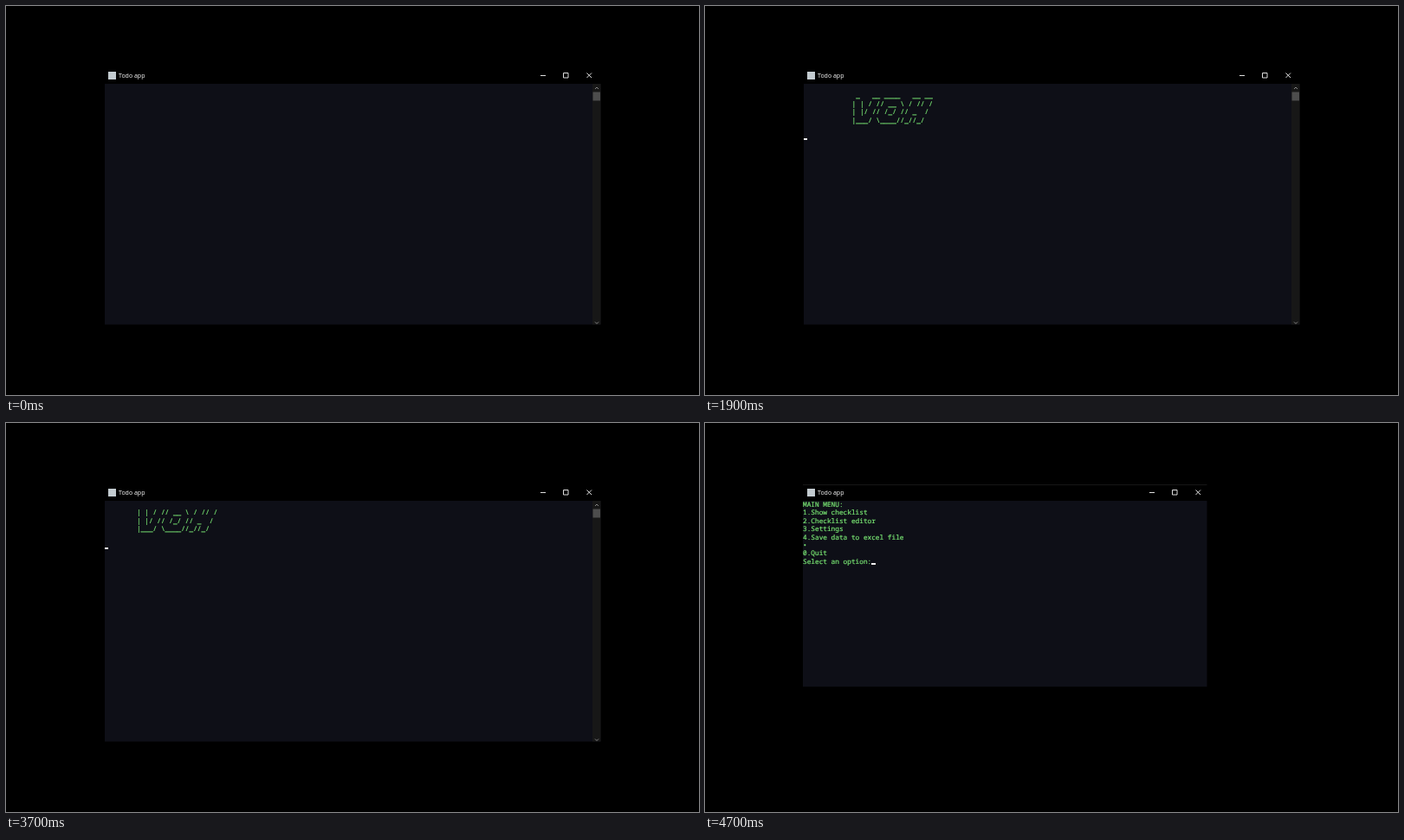
An HTML page for the animation above (5 s loop, 800 by 450 pixels).

```html
<!DOCTYPE html>
<html lang="en">
<head>
<meta charset="utf-8">
<title>Todo app</title>
<style>
  html, body { margin: 0; width: 100%; height: 100%; overflow: hidden; background: #000; }
  svg, pre, #cursor, #title { position: absolute; }
  svg { left: 0; top: 0; }
  #title { left: 130px; top: 76px; font: 7px/10px "Open Sans", sans-serif; color: #fff; }
  pre {
    margin: 0; top: 91px; color: #7ae874; text-rendering: geometricPrecision;
    -webkit-text-stroke: .2px #7ae874;
    font: 7.78px/9.37px "Noto Sans Mono", "DejaVu Sans Mono", monospace;
  }
  #cursor { width: 4.6px; height: 2px; background: #f4f4f4; }
</style>
</head>
<body>
<svg width="800" height="450" viewBox="0 0 800 450" fill="none">
  <path id="edge" d="M113 71.5h466.5" stroke="#161616"/>
  <rect id="body" y="90" fill="#0e0f17"/>
  <rect x="118" y="76" width="9" height="9" fill="#c3cbd0"/>
  <g id="buttons" stroke="#dedede">
    <path d="M617 80.5h6M643.5 77.5h5.5v5.5h-5.5zM670.5 77.5l5.5 5.5m0-5.5l-5.5 5.5"/>
  </g>
  <g id="scroll">
    <path d="M677 90h9.5v278.5h-9.5z" fill="#171717"/>
    <path d="M677.5 99.5h8.5v10h-8.5z" fill="#4d4d4d"/>
    <path d="M680 96l2-2 2 2M680 365.5l2 2 2-2" stroke="#858585"/>
  </g>
</svg>
<div id="title">Todo app</div>
<pre id="screen"></pre>
<div id="cursor"></div>
<script>
const CELL_W = 4.668, CELL_H = 9.37, LOOP = 5000;
const $ = id => document.getElementById(id);
const raw = String.raw;
const lines = s => s.split("\n").slice(1, 5);

const E = lines(raw`
 ___
| __|
| _|
|___|`);

// Each letter with the column where it starts
const welcome = [
  [0, lines(raw`
__      __
\ \    / /
 \ \/\/ /
  \_/\_/`)],
  [9, E],
  [13, lines(raw`
 _
| |
| |__
|____|`)],
  [17, lines(raw`
  ___
 / __|
| (__
 \___|`)],
  [21, lines(raw`
  ___
 / _ \
| (_) |
 \___/`)],
  [27, lines(raw`
 __  __
|  \/  |
| |\/| |
|_|  |_|`)],
  [34, E]
];

const user = lines(raw`
 _   __ ____   __ __
| | / // __ \ / // /
| |/ // /_/ // _  /
|___/ \____//_//_/`);

const menu = ["MAIN MENU:", "1.Show checklist", "2.Checklist editor", "3.Settings",
  "4.Save data to excel file", "•", "0.Quit", "Select an option:"];

// Joins letters; a new stroke covers the old one, except a slash
function join(letters) {
  const rows = [[], [], [], []];
  for (const [col, art] of letters)
    art.forEach((line, r) => [...line].forEach((ch, i) => {
      if (ch !== " " && rows[r][col + i] !== "/") rows[r][col + i] = ch;
    }));
  return rows.map(row => Array.from(row, ch => ch || " ").join(""));
}

const indent = (art, n) => ["", ...art.map(line => " ".repeat(n) + line)];

// Console state: text rows, cursor row and column, window size
function stateAt(t) {
  if (t < 200) return { rows: [], row: t < 100 ? -1 : 0 };
  if (t < 1900) {
    const count = Math.min(7, Math.floor(t / 200));
    return { rows: indent(join(welcome.slice(0, count)), 9), row: 6 };
  }
  if (t < 3700) {
    const moves = [2200, 2400, 2700, 2900, 3200, 3500].filter(m => t >= m).length;
    return { rows: indent(user, moves % 2 ? 8 : 12), row: 6 };
  }
  if (t < 4500) {
    const gone = 1 + Math.floor((t - 3700) / 200);
    return { rows: indent(user.slice(gone), 8), row: 6 - gone };
  }
  if (t < 4600) return { rows: [], row: 0 };
  if (t < 4700) return { rows: [], row: 0, small: true };
  return { rows: menu, row: 7, col: 17, small: true };
}

function setBox(x, w, h) {
  const box = { x, width: w, height: h };
  for (const key in box) $("body").setAttribute(key, box[key]);
}

function draw() {
  const { rows, row, col = 0, small = false } = stateAt(performance.now() % LOOP);
  const left = small ? 113 : 113.7;
  if (small) setBox(113, 466.5, 215); else setBox(114, 572.5, 278.5);
  $("edge").style.display = small ? "" : "none";
  $("scroll").style.display = small ? "none" : "";
  $("buttons").setAttribute("transform", `translate(${small ? -104 : 0} 0)`);
  const text = rows.join("\n");
  if ($("screen").textContent !== text) $("screen").textContent = text;
  $("screen").style.left = left + "px";
  const cursor = $("cursor").style;
  cursor.display = row < 0 ? "none" : "";
  cursor.left = left + col * CELL_W + "px";
  cursor.top = 96.8 + row * CELL_H + "px";
  requestAnimationFrame(draw);
}
draw();
</script>
</body>
</html>
```
